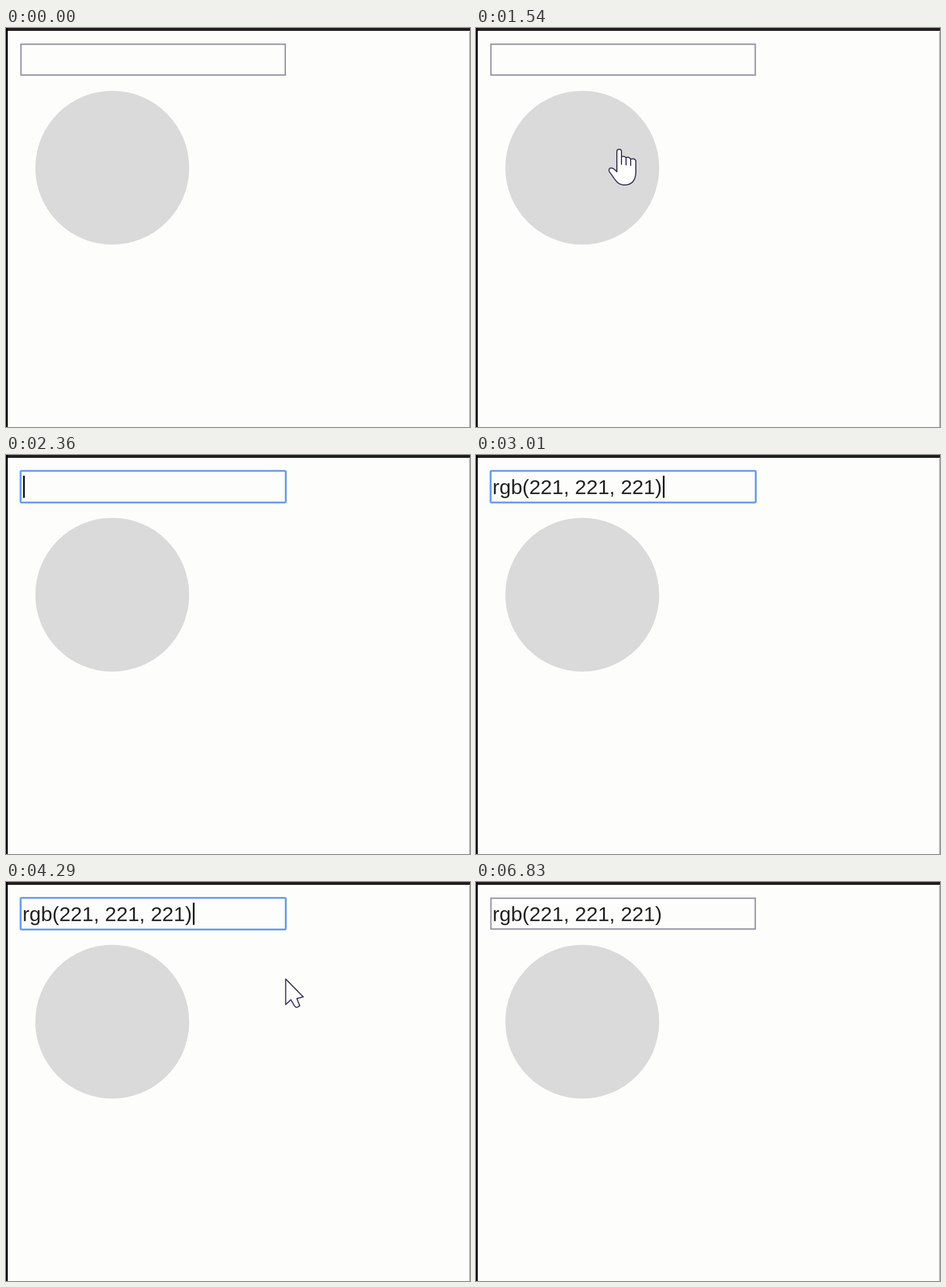
Write an HTML page that moves like this. It is 807 px wide and 694 px high and loops after 8 s.

```html
<!DOCTYPE html>
<html lang="en">
<head>
<meta charset="utf-8">
<title>Colour field</title>
<style>
  html, body { margin: 0; width: 100%; height: 100%; overflow: hidden; background: #fdfdfb; }
  svg { display: block; width: 807px; height: 694px; }
  text { font: 35.8px "Liberation Sans", Arial, sans-serif; fill: #222; }
  .soft { filter: blur(.5px); }
  .pointer { fill: #fff; stroke: #3a3a5e; stroke-width: 2; stroke-linejoin: round; stroke-linecap: round; }
</style>
</head>
<body>
<svg viewBox="0 0 807 694">
  <g class="soft">
    <rect x="-9" y="-9" width="825" height="712" fill="#fdfdfb"/>
    <path d="M806.3 6V703" stroke="#a5a5ad" stroke-width="1.4"/>
    <rect x="-9" y="-9" width="825" height="14" fill="#231d20"/>
    <rect x="-9" y="-9" width="12" height="712"/>

    <circle cx="184.8" cy="243" r="133.8" fill="#dadada"/>

    <rect id="plain" x="26" y="28.2" width="459.7" height="53.6" fill="none" stroke="#9797a8" stroke-width="2.5"/>
    <rect id="ring" x="25.4" y="27.6" width="461.2" height="55" rx="2" fill="none" stroke="#6a9ef0" stroke-width="3.4"/>
    <text id="value" x="28.8" y="68">rgb(221, 221, 221)</text>
    <rect id="caret" y="36" width="2.8" height="38.5"/>

    <g id="hand" class="pointer">
      <path d="M-4 4Q-4 0 0 0T4 4V13Q9 11 12 14.5Q17 12 20 17Q27 15 29 20V38Q29 62 9 62Q-1 62 -7 53L-17 39Q-19 34 -15 32.5Q-11 32 -7 36L-4 39Z"/>
      <path d="M4 13V26M12 14.5V27M20 17V28" fill="none"/>
    </g>
    <path id="arrow" class="pointer" d="M.5 0V44.5L9.5 36L16 47Q19 51.5 25 46.5L20 34L31 31Z"/>
  </g>
</svg>
<script>
const LOOP = 8000, STEP = 65;
const FOCUS = 2360, PASTE = 3010, BLUR = 4370, BLINK = 510;

// Where the pointer enters, then each move from wherever it rests
const entry = { x: 590, y: 466 };
const moves = [
  { from: 500, to: 720, x: 278, y: 255 },   // onto the disc
  { from: 720, to: 910, x: 249, y: 211 },
  { from: 1540, to: 1890, x: 238, y: 60 },  // into the field
  { from: 3550, to: 3810, x: 455, y: 154 }, // out of it
  { from: 4225, to: 4370, x: 524, y: 187 }, // click beside it
  { from: 4665, to: 4890, x: 860, y: 260 }  // off the stage
];

const $ = id => document.getElementById(id);
const show = (id, on) => $(id).setAttribute("visibility", on ? "visible" : "hidden");
const mix = (a, b, u) => a + (b - a) * u;

function pointerAt(t) {
  let { x, y } = entry;
  for (const move of moves) {
    if (t < move.from) break;
    const elapsed = Math.floor((t - move.from) / STEP) * STEP;
    const u = t >= move.to ? 1 : elapsed / (move.to - move.from);
    x = mix(x, move.x, u);
    y = mix(y, move.y, u);
  }
  return { x, y };
}

function draw(t) {
  const focused = t >= FOCUS && t < BLUR;
  const pasted = t >= PASTE;
  const sinceReset = t - (pasted ? PASTE : FOCUS);
  show("plain", !focused);
  show("ring", focused);
  show("value", pasted);
  show("caret", focused && Math.floor(sinceReset / BLINK) % 2 === 0);
  $("caret").setAttribute("x", pasted ? 325 : 29.8);

  const { x, y } = pointerAt(t);
  const overField = x < 488 && y < 84;
  const overDisc = Math.hypot(x - 185, y - 243) < 134;
  const visible = t >= moves[0].from && !overField;
  show("hand", visible && overDisc);
  show("arrow", visible && !overDisc);
  for (const id of ["hand", "arrow"]) $(id).setAttribute("transform", `translate(${x} ${y})`);
}

const start = performance.now();
function frame() {
  draw((performance.now() - start) % LOOP);
  requestAnimationFrame(frame);
}
frame();
</script>
</body>
</html>
```
